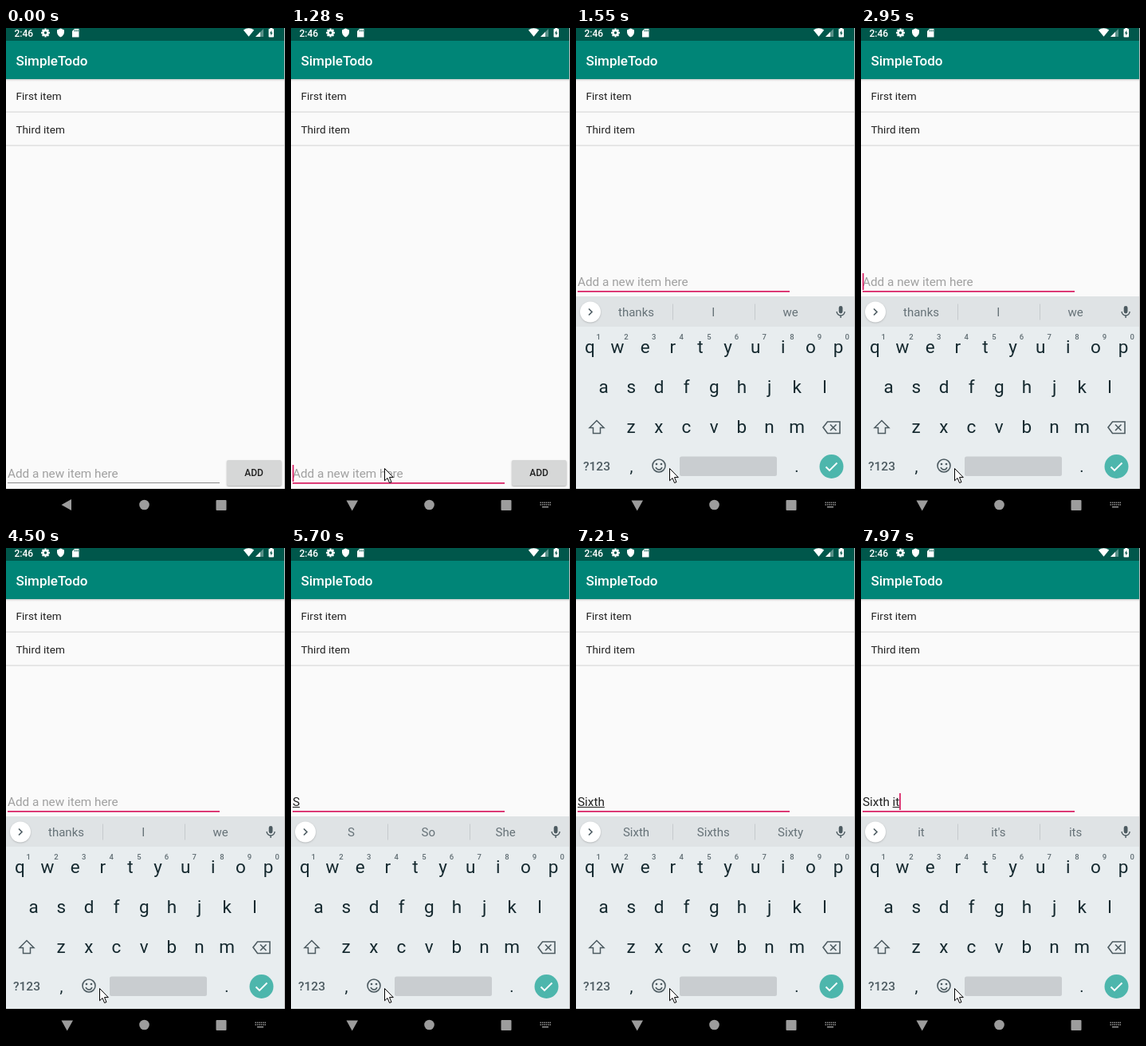
Write an HTML page with a canvas that moves like this. It is 350 px wide and 616 px high and loops after 8 s.

```html
<!DOCTYPE html>
<html lang="en">
<head>
<meta charset="utf-8">
<title>Todo list</title>
<style>
html, body { margin: 0; width: 100%; height: 100%; overflow: hidden; background: #fafafa; }
canvas { display: block; width: 350px; height: 616px; }
</style>
</head>
<body>
<canvas id="stage"></canvas>
<script>
const W = 350, H = 616, LOOP = 8000;
const canvas = document.getElementById('stage');
const ratio = window.devicePixelRatio || 1;
canvas.width = W * ratio;
canvas.height = H * ratio;
const g = canvas.getContext('2d');
const PINK = '#d81b60', INK = '#222', ICON = '#4d5b61';

// Each step: start time, finished words, word being composed, suggestions
const typing = [
  [0, '', '', ['thanks', 'I', 'we']],
  [5240, '', 'S', ['S', 'So', 'She']],
  [5820, '', 'Si', ['Si', 'Six', 'Since']],
  [5940, '', 'Six', ['Six', 'Sir', 'Sixth']],
  [6530, '', 'Sixt', ['Sixt', 'Sixth', 'Sixty']],
  [6650, '', 'Sixth', ['Sixth', 'Sixths', 'Sixty']],
  [7360, 'Sixth ', '', ['grade', 'and', 'year']],
  [7730, 'Sixth ', 'i', ['I', 'in', 'is']],
  [7850, 'Sixth ', 'it', ['it', "it's", 'its']]
];
const caretOn = [[820, 1430], [1980, 2510], [2950, 3510], [3940, 4500],
  [4960, 5700], [5820, 7210], [7360, LOOP]];
const pointer = [[270, 236, 607], [420, 190, 584], [550, 145, 561], [700, 117, 551]];

const latest = (steps, t) => steps.filter(s => s[0] <= t).pop();

function rect(x, y, w, h, color) {
  g.fillStyle = color;
  g.fillRect(x, y, w, h);
}

function rounded(x, y, w, h, r, color) {
  g.fillStyle = color;
  g.beginPath();
  g.roundRect(x, y, w, h, r);
  g.fill();
}

function disc(x, y, r, color) {
  g.fillStyle = color;
  g.beginPath();
  g.arc(x, y, r, 0, Math.PI * 2);
  g.fill();
}

function trace(points, closed) {
  g.beginPath();
  for (let i = 0; i < points.length; i += 2) g.lineTo(points[i], points[i + 1]);
  if (closed) g.closePath();
}

function poly(points, color) {
  trace(points, true);
  g.fillStyle = color;
  g.fill();
}

function line(points, color, width, closed) {
  trace(points, closed);
  g.strokeStyle = color;
  g.lineWidth = width;
  g.stroke();
}

function text(str, x, y, size, color, align = 'left', weight = 400) {
  g.font = `${weight} ${size}px Roboto, sans-serif`;
  g.textAlign = align;
  g.fillStyle = color;
  g.fillText(str, x, y);
}

function gear(x, y) {
  for (let i = 0; i < 8; i++) {
    g.save();
    g.translate(x, y);
    g.rotate(i * Math.PI / 4);
    rect(-1.2, -5.4, 2.4, 3, '#fff');
    g.restore();
  }
  disc(x, y, 4.1, '#fff');
  disc(x, y, 1.7, '#00574b');
}

function statusBar() {
  rect(0, 0, W, 16, '#00574b');
  text('2:46', 10.5, 10.5, 12, '#fff', 'left', 500);
  gear(49.5, 6);
  g.fillStyle = '#fff';
  g.beginPath();
  g.moveTo(68.5, 0.5);
  g.lineTo(73, 2.4);
  g.lineTo(73, 5.5);
  g.quadraticCurveTo(72.5, 9.5, 68.5, 11.5);
  g.quadraticCurveTo(64.5, 9.5, 64, 5.5);
  g.lineTo(64, 2.4);
  g.fill();
  poly([86, 1, 91.5, 1, 91.5, 11.5, 83, 11.5, 83, 4], '#fff');
  for (const x of [86, 88, 90]) rect(x - 0.3, 2.2, 0.9, 2.3, '#00574b');
  // Wi-Fi, signal and battery
  g.fillStyle = '#fff';
  g.beginPath();
  g.moveTo(304.5, 10.8);
  g.lineTo(297.8, 2.4);
  g.quadraticCurveTo(304.5, -2, 311.2, 2.4);
  g.fill();
  poly([323, 1, 323, 11, 313, 11], 'rgba(255,255,255,.35)');
  poly([319, 5, 319, 11, 313, 11], '#fff');
  rect(331.3, 0, 3, 2, '#fff');
  rounded(329.5, 1, 6.5, 10.5, 0.8, '#fff');
  poly([333.3, 2.8, 330.9, 6.8, 332.4, 6.8, 332.1, 9.8, 334.6, 5.7, 333.1, 5.7], '#00574b');
}

function appBar() {
  rect(0, 16, W, 48, '#008577');
  text('SimpleTodo', 12.5, 46.5, 17, '#fff', 'left', 500);
  const shade = g.createLinearGradient(0, 64, 0, 67);
  shade.addColorStop(0, 'rgba(0,0,0,.16)');
  shade.addColorStop(1, 'rgba(0,0,0,0)');
  rect(0, 64, W, 3, shade);
}

function list() {
  ['First item', 'Third item'].forEach((item, i) => {
    const y = 89.5 + i * 42;
    text(item, 12.5, y, 13.6, INK);
    rect(0, y + 15, W, 1.3, '#dcdcdc');
  });
}

function addButton() {
  g.save();
  g.shadowColor = 'rgba(0,0,0,.3)';
  g.shadowBlur = 2 * ratio;
  g.shadowOffsetY = ratio;
  rounded(277, 541, 68.5, 32, 2, '#d6d7d7');
  g.restore();
  text('ADD', 311, 560.5, 12, INK, 'center', 500);
}

function field(t) {
  const base = t < 1430 ? 563 : 323;
  const [, done, word] = latest(typing, t);
  if (done + word) text(done + word, 2, base, 15.3, INK);
  else text('Add a new item here', 2, base, 15.3, '#a0a0a0');
  const start = 2 + g.measureText(done).width;
  const end = 2 + g.measureText(done + word).width;
  if (word) rect(start, base + 1, end - start, 1, INK);

  if (t < 820) rect(2, base + 6, 266, 1, '#8b8b8b');
  else rect(2, base + 6, 266, 1.7, PINK);
  if (caretOn.some(([a, b]) => t >= a && t < b)) {
    rect(end ? Math.max(1.8, end - 0.2) : 1.8, base - 16, 1.7, 21, PINK);
  }
}

function navBar(t) {
  const grey = '#9c9c9c';
  rect(0, 577, W, 39, '#000');
  if (t < 1280) {
    poly([69.5, 597, 82, 590, 82, 604], grey);
  } else {
    poly([69.5, 591.5, 84, 591.5, 76.7, 604.5], grey);
    for (let row = 0; row < 2; row++) {
      for (let i = 0; i < 6; i++) rect(312.5 + i * 2.4, 593.5 + row * 2.6, 1.4, 1.5, grey);
    }
    rect(315, 599, 8, 1.4, grey);
  }
  disc(173.5, 597, 6.3, grey);
  rounded(263.5, 591, 13, 13, 1, grey);
}

function suggestions(words) {
  rect(0, 336, 349, 38, '#dfe3e5');
  g.save();
  g.shadowColor = 'rgba(0,0,0,.22)';
  g.shadowBlur = 2 * ratio;
  g.shadowOffsetY = 0.7 * ratio;
  disc(18, 355.5, 13, '#fff');
  g.restore();
  line([16, 351.5, 20, 355.5, 16, 359.5], ICON, 1.6);
  words.forEach((w, i) => text(w, 75.5 + i * 96.8, 361, 15, '#667278', 'center'));
  for (const x of [121, 224]) rect(x, 345.5, 1, 20, '#c5cacd');
  rounded(329.7, 348, 4.8, 9.5, 2.4, ICON);
  g.strokeStyle = ICON;
  g.lineWidth = 1.4;
  g.beginPath();
  g.arc(332.1, 355, 5, 0, Math.PI);
  g.stroke();
  rect(331.4, 360, 1.4, 3, ICON);
}

function keyRow(keys, x, base) {
  [...keys].forEach((key, i) => text(key, x + i * 34.65, base, 22.5, '#15292f', 'center'));
}

function keyboard(words) {
  rect(0, 336, 349, 241, '#e8edef');
  suggestions(words);
  keyRow('qwertyuiop', 17.3, 406.5);
  [...'1234567890'].forEach((d, i) => text(d, 28.3 + i * 34.65, 390, 9.5, '#5f6c72', 'center', 500));
  keyRow('asdfghjkl', 34.7, 456.5);
  keyRow('zxcvbnm', 69.2, 506.5);

  // Shift and backspace
  line([26, 491.5, 35, 500.5, 30.5, 500.5, 30.5, 507.5, 21.5, 507.5, 21.5, 500.5, 17, 500.5], ICON, 1.5, true);
  line([310, 500, 315.5, 493, 331, 493, 331, 507.5, 315.5, 507.5], ICON, 1.6, true);
  line([319, 496.5, 326.5, 504], ICON, 1.6);
  line([326.5, 496.5, 319, 504], ICON, 1.6);

  text('?123', 26, 554, 15.5, ICON, 'center', 500);
  text(',', 69.5, 556, 20, '#15292f', 'center');
  text('.', 277, 556, 20, '#15292f', 'center');
  g.strokeStyle = ICON;
  g.lineWidth = 1.6;
  g.beginPath();
  g.arc(104, 548, 8, 0, Math.PI * 2);
  g.stroke();
  disc(101, 546, 1.3, ICON);
  disc(107, 546, 1.3, ICON);
  g.beginPath();
  g.arc(104, 549, 4, 0.25, Math.PI - 0.25);
  g.stroke();
  rounded(130, 536.5, 122, 24.5, 2.5, '#c9cdd0');
  disc(320.5, 549, 15, '#4db6ac');
  line([313.5, 549.5, 318, 554, 327.5, 544.5], '#fff', 1.9);
}

// The keyboard enters lowered and half faded, over the navigation bar
function enteringKeyboard(words) {
  const layer = document.createElement('canvas');
  layer.width = canvas.width;
  layer.height = canvas.height;
  return { layer, draw() {
    const saved = g.getImageData(0, 0, canvas.width, canvas.height);
    g.clearRect(0, 0, W, H);
    keyboard(words);
    layer.getContext('2d').drawImage(canvas, 0, 0);
    g.putImageData(saved, 0, 0);
    g.globalAlpha = 0.7;
    g.drawImage(layer, 0, 22, W, H);
    g.globalAlpha = 1;
  } };
}
const entering = enteringKeyboard(typing[0][3]);

function mouse(t) {
  const at = latest(pointer, t);
  if (!at) return;
  g.save();
  g.translate(at[1], at[2]);
  const arrow = [0.5, 0.5, 0.5, 15.8, 4, 12.5, 6.6, 18.5, 9, 17.5, 6.5, 11.6, 11.3, 11.6];
  poly(arrow, '#fff');
  line(arrow, '#000', 1, true);
  g.restore();
}

function draw(t) {
  g.setTransform(ratio, 0, 0, ratio, 0, 0);
  rect(0, 0, W, H, '#fafafa');
  statusBar();
  appBar();
  list();
  field(t);
  if (t < 1430) addButton();
  rect(349, 0, 1, 577, '#bdbdbd');
  navBar(t);
  if (t >= 1550) keyboard(latest(typing, t)[3]);
  else if (t >= 1430) entering.draw();
  mouse(t);
}

const begin = performance.now();
function tick() {
  draw((performance.now() - begin) % LOOP);
  requestAnimationFrame(tick);
}
tick();
</script>
</body>
</html>
```
